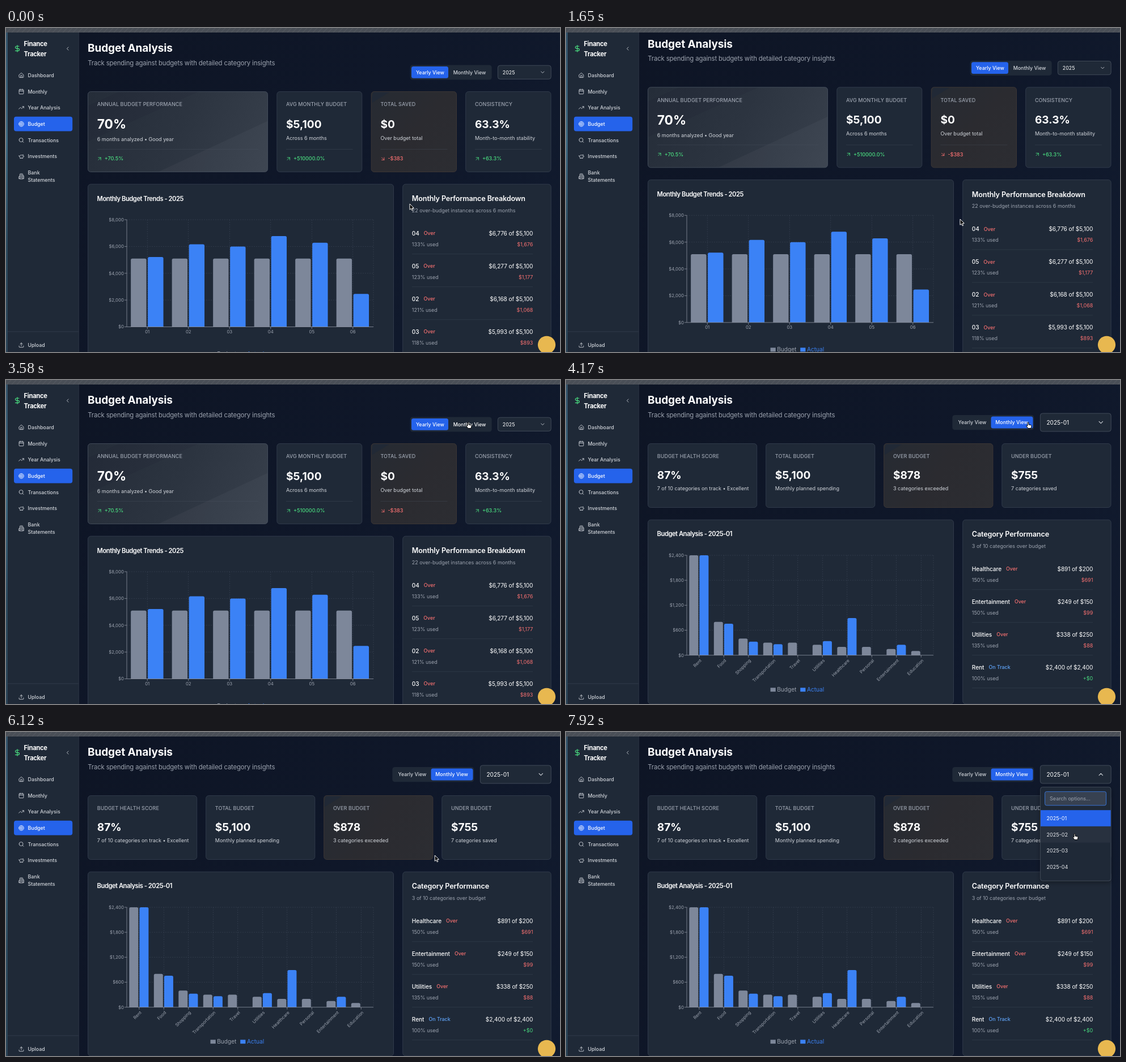
An HTML page with a canvas that plays this animation: 977x573 px, repeating every 8000 ms.

```html
<!DOCTYPE html>
<html lang="en">
<head>
<meta charset="utf-8">
<title>Budget Analysis</title>
<style>
html, body { margin: 0; width: 100%; height: 100%; overflow: hidden; background: #0f1729; }
canvas { display: block; width: 977px; height: 573px; }
</style>
</head>
<body>
<canvas id="stage"></canvas>
<script>
const W = 977, H = 573, LOOP = 8000;
const cv = document.getElementById('stage');
const dpr = window.devicePixelRatio || 1;
cv.width = W * dpr;
cv.height = H * dpr;
const c = cv.getContext('2d');

const WHITE = '#ffffff', SOFT = '#d1d5db', MUTED = '#9ca3af', LINE = '#374151', EDGE = '#4b5563';
const CARD = '#1f2937', BLUE = '#2563eb', BAR = '#3b82f6', GREY = '#7d879a';
const GREEN = '#4ade80', RED = '#f87171', SKY = '#60a5fa';
const SM = 8.86, NOTE = 9.03, BASE = 10.1, TICK = 7.8;

const ICONS = {
  dollar: 'M12 2v20M17 5H9.5a3.5 3.5 0 0 0 0 7h5a3.5 3.5 0 0 1 0 7H6',
  home: 'M15 21v-8a1 1 0 0 0-1-1h-4a1 1 0 0 0-1 1v8M3 10l9-8 9 8v9a2 2 0 0 1-2 2H5a2 2 0 0 1-2-2z',
  calendar: 'M8 2v4M16 2v4M3 10h18M5 4h14a2 2 0 0 1 2 2v14a2 2 0 0 1-2 2H5a2 2 0 0 1-2-2V6a2 2 0 0 1 2-2z',
  trend: 'M22 7l-8.5 8.5-5-5L2 17M16 7h6v6',
  target: 'M2 12a10 10 0 1 0 20 0a10 10 0 1 0-20 0M6 12a6 6 0 1 0 12 0a6 6 0 1 0-12 0M10 12a2 2 0 1 0 4 0a2 2 0 1 0-4 0',
  search: 'M3 11a8 8 0 1 0 16 0a8 8 0 1 0-16 0M21 21l-4.3-4.3',
  piggy: 'M19 5c-1.5 0-2.8 1.4-3 2-3.5-1.5-11-.3-11 5 0 1.8 0 3 2 4.5V20h4v-2h3v2h4v-4c1-.5 1.7-1 2-2h2v-4h-2c0-1-.5-1.5-1-2zM2 9v1c0 1.1.9 2 2 2h1M16 11h.01',
  building: 'M6 22V4a2 2 0 0 1 2-2h8a2 2 0 0 1 2 2v18zM6 12H4a2 2 0 0 0-2 2v8h4M18 9h2a2 2 0 0 1 2 2v11h-4M10 6h4M10 10h4M10 14h4M10 18h4',
  upload: 'M21 15v4a2 2 0 0 1-2 2H5a2 2 0 0 1-2-2v-4M17 8l-5-5-5 5M12 3v12',
  up: 'M7 7h10v10M7 17L17 7',
  down: 'M7 7l10 10M17 7v10H7',
  left: 'M15 18l-6-6 6-6',
  open: 'M6 9l6 6 6-6',
  close: 'M18 15l-6-6-6 6'
};

const YEAR_CARDS = [
  [144.5, 317, 'ANNUAL BUDGET PERFORMANCE', '70%', '6 months analyzed • Good year', '+70.5%'],
  [477.8, 150, 'AVG MONTHLY BUDGET', '$5,100', 'Across 6 months', '+510000.0%'],
  [644.2, 150.3, 'TOTAL SAVED', '$0', 'Over budget total', '-$383'],
  [810.7, 150.3, 'CONSISTENCY', '63.3%', 'Month-to-month stability', '+63.3%']
];
const MONTH_CARDS = [
  ['BUDGET HEALTH SCORE', '87%', '7 of 10 categories on track • Excellent'],
  ['TOTAL BUDGET', '$5,100', 'Monthly planned spending'],
  ['OVER BUDGET', '$878', '3 categories exceeded'],
  ['UNDER BUDGET', '$755', '7 categories saved']
];
const YEAR_ROWS = [
  ['04', 'Over', '$6,776 of $5,100', '133%', '$1,676'],
  ['05', 'Over', '$6,277 of $5,100', '123%', '$1,177'],
  ['02', 'Over', '$6,168 of $5,100', '121%', '$1,068'],
  ['03', 'Over', '$5,993 of $5,100', '118%', '$893']
];
const MONTH_ROWS = [
  ['Healthcare', 'Over', '$891 of $200', '150%', '$691'],
  ['Entertainment', 'Over', '$249 of $150', '150%', '$99'],
  ['Utilities', 'Over', '$338 of $250', '135%', '$88'],
  ['Rent', 'On Track', '$2,400 of $2,400', '100%', '+$0']
];
const YEAR_DATA = [5214, 6168, 5993, 6776, 6277, 2461].map((v, i) => ['0' + (i + 1), 5100, v]);
const MONTH_DATA = [
  ['Rent', 2400, 2400], ['Food', 800, 757], ['Shopping', 400, 325], ['Transportation', 300, 265],
  ['Travel', 300, 0], ['Utilities', 250, 338], ['Healthcare', 200, 891], ['Personal', 200, 0],
  ['Entertainment', 150, 249], ['Education', 100, 0]
];

function text(s, x, y, size, color, weight = 400, align = 'left', space = 0) {
  c.font = `${weight} ${size}px Inter, "Open Sans", sans-serif`;
  c.letterSpacing = space + 'px';
  c.textAlign = align;
  c.fillStyle = color;
  c.fillText(s, x, y + size * 0.364);
  return c.measureText(s).width;
}

function box(x, y, w, h, r, fill, stroke) {
  c.beginPath();
  c.roundRect(x, y, w, h, r);
  if (fill) { c.fillStyle = fill; c.fill(); }
  if (stroke) { c.strokeStyle = stroke; c.lineWidth = 0.8; c.stroke(); }
}

function line(x1, y1, x2, y2, color, width = 0.7) {
  c.beginPath();
  c.moveTo(x1, y1);
  c.lineTo(x2, y2);
  c.strokeStyle = color;
  c.lineWidth = width;
  c.stroke();
}

function icon(name, x, y, size, color) {
  c.save();
  c.translate(x - size / 2, y - size / 2);
  c.scale(size / 24, size / 24);
  c.lineWidth = 2;
  c.lineCap = c.lineJoin = 'round';
  c.strokeStyle = color;
  c.stroke(new Path2D(ICONS[name]));
  c.restore();
}

function blend(x1, y1, x2, y2, ...colors) {
  const g = c.createLinearGradient(x1, y1, x2, y2);
  colors.forEach((k, i) => g.addColorStop(i / (colors.length - 1), k));
  return g;
}

function poly(color, ...p) {
  c.beginPath();
  for (let i = 0; i < p.length; i += 2) c.lineTo(p[i], p[i + 1]);
  c.closePath();
  c.fillStyle = color;
  c.fill();
}

function sidebar() {
  c.fillStyle = CARD;
  c.fillRect(3, 0, 125, H + 20);
  line(128.3, 0, 128.3, H + 20, LINE);
  icon('dollar', 20, 36.3, 14, GREEN);
  text('Finance', 31.5, 28, 11.2, WHITE, 700, 'left', -0.3);
  text('Tracker', 31.5, 46, 11.2, WHITE, 700, 'left', -0.3);
  icon('left', 108.7, 36.5, 10.4, SOFT);
  box(14, 156.7, 103.2, 25.7, 4, BLUE);
  const names = ['Dashboard', 'Monthly', 'Year Analysis', 'Budget', 'Transactions', 'Investments'];
  const icons = ['home', 'calendar', 'trend', 'target', 'search', 'piggy'];
  names.forEach((s, i) => {
    const y = 83.7 + i * 28.68, on = i === 3;
    icon(icons[i], 27, y, 10.4, on ? WHITE : SOFT);
    text(s, 38.5, y, SM, on ? WHITE : SOFT, 500);
  });
  icon('building', 27, 262.2, 10.4, SOFT);
  text('Bank', 38.5, 255.8, SM, SOFT, 500);
  text('Statements', 38.5, 268.8, SM, SOFT, 500);
  line(3, 537, 128, 537, LINE);
  icon('upload', 27, 560.8, 10.4, SOFT);
  text('Upload', 38.5, 560.8, SM, SOFT, 500);
}

function heading() {
  text('Budget Analysis', 144, 35.5, 19, WHITE, 700, 'left', -0.1);
  text('Track spending against budgets with detailed category insights', 144.3, 61.8, 11.3, MUTED, 400, 'left', -0.12);
}

function toggle(x, y, monthly, hover) {
  box(x, y, 144, 26.2, 4.5, CARD);
  if (monthly) box(x + 68.2, y + 2.6, 74, 20.8, 3.5, BLUE);
  else box(x + 2.3, y + 2.6, 65, 20.8, 3.5, BLUE);
  text('Yearly View', x + 35.2, y + 13, SM, monthly ? SOFT : WHITE, 500, 'center');
  text('Monthly View', x + 104.8, y + 13, SM, monthly || hover ? WHITE : SOFT, 500, 'center');
}

function statCard(x, y, w, h, warm) {
  if (!warm) return box(x, y, w, h, 5, CARD, LINE);
  box(x, y, w, h, 5, blend(x, y, x + w, y + h, '#262b33', '#2b2b30', '#2c2d32'), '#453b38');
  poly('rgba(31,41,55,.7)', x + 1, y + 12, x + 4, y + 1, x + 32, y + 1, x + 1, y + 20);
}

function shinyCard(x, y, w, h) {
  c.save();
  box(x, y, w, h, 5, blend(x, y, x + w, y + h, '#252d39', '#2c3440', '#38404c'));
  c.clip();
  const b = y + h, r = x + w;
  poly('rgba(255,255,255,.03)', x + 124, b, r, y + 52, r, b);
  poly('rgba(15,23,42,.08)', x + 55, y, x + 195, y, x, y + 88, x, y + 25);
  c.restore();
  box(x, y, w, h, 5, null, EDGE);
}

function title(s, x, y) { text(s, x, y, 11.2, WHITE, 600, 'left', -0.47); }

function rows(list, y0) {
  list.forEach(([name, tag, amount, used, diff], i) => {
    const y = y0 + i * 58, over = tag === 'Over';
    const w = text(name, 715.8, y, BASE, WHITE, 500, 'left', -0.05);
    text(tag, 716 + w + 7.8, y, SM, over ? RED : SKY, 500);
    text(amount, 929.3, y, BASE, WHITE, 400, 'right', -0.1);
    text(used + ' used', 715.8, y + 19.3, NOTE, MUTED);
    text(diff, 929.3, y + 19.3, NOTE, over ? RED : GREEN, 400, 'right');
    line(716, y + 36.7, 929, y + 36.7, 'rgba(75,85,99,.45)');
  });
}

function chart(data, top, bottom, max, grow, slant) {
  const x0 = 213, x1 = 648, band = (x1 - x0) / data.length, h = bottom - top;
  const gap = slant ? 2.1 : 2.6, bw = slant ? 16 : 27.4;
  const pad = (band - bw * 2 - gap) / 2 - 0.4;
  c.setLineDash([2, 2]);
  for (let i = 1; i <= 4; i++) line(x0, bottom - h * i / 4, x1, bottom - h * i / 4, LINE);
  data.forEach((d, i) => line(x0 + band * (i + 0.5), top, x0 + band * (i + 0.5), bottom, LINE));
  line(x1, top, x1, bottom, LINE);
  c.setLineDash([]);
  data.forEach(([name, ...vals], i) => {
    const mid = x0 + band * (i + 0.5);
    vals.forEach((v, k) => {
      const bh = h * v / max * grow, r = Math.min(2.6, bh);
      if (bh > 0) box(x0 + band * i + pad + k * (bw + gap), bottom - bh, bw, bh, [r, r, 0, 0], k ? BAR : GREY);
    });
    line(mid, bottom, mid, bottom + 4, MUTED);
    if (!slant) return text(name, mid, bottom + 8.7, TICK, MUTED, 400, 'center');
    c.save();
    c.translate(mid + 2.7, bottom + 8);
    c.rotate(-Math.PI / 4);
    text(name, 0, 0, TICK, MUTED, 400, 'right');
    c.restore();
  });
  line(x0, top, x0, bottom, MUTED);
  line(x0, bottom, x1, bottom, MUTED);
  for (let i = 0; i <= 4; i++) {
    const y = bottom - h * i / 4;
    line(x0 - 4, y, x0, y, MUTED);
    text('$' + (max * i / 4).toLocaleString('en-US'), 207.8, y, TICK, MUTED, 400, 'right');
  }
}

function legend(y) {
  c.fillStyle = GREY;
  c.fillRect(360.5, y - 2.9, 9.2, 6.9);
  c.fillStyle = BAR;
  c.fillRect(413.2, y - 2.9, 9.2, 6.9);
  text('Budget', 372.2, y, BASE, MUTED);
  text('Actual', 425, y, BASE, BAR);
}

function panel(y, h, name, note) {
  box(699.7, y, 261.5, h, 5, CARD, LINE);
  text(name, 715.8, y + 25.5, 12.6, WHITE, 600, 'left', -0.13);
  text(note, 715.8, y + 46.2, NOTE, MUTED);
}

function yearView(hover) {
  heading();
  toggle(712.7, 65.4, false, hover);
  box(867.4, 66.2, 93.8, 24.2, 4, CARD, EDGE);
  text('2025', 875.8, 78.3, SM, WHITE);
  icon('open', 946.3, 78.3, 10.4, SOFT);
  YEAR_CARDS.forEach(([x, w, label, value, note, trend], i) => {
    const tx = x + 16.2, neg = i === 2, col = neg ? RED : GREEN;
    if (i) statCard(x, 112.5, w, 142, neg);
    else shinyCard(x, 112.5, w, 142);
    text(label, tx, 135.2, 9, MUTED, 500, 'left', 0.08);
    text(value, tx, 170, i ? 19.1 : 22.8, WHITE, 700);
    text(note, tx, i ? 194.7 : 197, NOTE, SOFT);
    line(tx, 214.5, x + w - 16.2, 214.5, 'rgba(75,85,99,.5)');
    icon(neg ? 'down' : 'up', tx + 4.3, 231.2, 10.4, col);
    text(trend, tx + 13, 231.2, NOTE, col, 500);
  });
  box(144.5, 276.2, 539, 326, 5, CARD, LINE);
  title('Monthly Budget Trends - 2025', 160.6, 301.5);
  chart(YEAR_DATA, 339, 528.5, 8000, 1, false);
  legend(576);
  panel(276.2, 326, 'Monthly Performance Breakdown', '22 over-budget instances across 6 months');
  rows(YEAR_ROWS, 363);
}

function monthView(grow, open) {
  heading();
  toggle(681.3, 62, true);
  box(836.4, 59, 124.8, 32, 4, CARD, EDGE);
  text('2025-01', 847.4, 75.2, BASE, WHITE);
  icon(open ? 'close' : 'open', 943.3, 75, 13, SOFT);
  MONTH_CARDS.forEach(([label, value, note], i) => {
    const x = 144.5 + i * 208.1;
    statCard(x, 112.5, 192.2, 113, i === 2);
    text(label, x + 16.2, 135.2, 9, MUTED, 500, 'left', 0.08);
    text(value, x + 16.2, 167.6, 19.1, WHITE, 700);
    text(note, x + 16.2, 192, NOTE, SOFT);
  });
  box(144.5, 247.3, 539, 325.5, 5, CARD, LINE);
  title('Budget Analysis - 2025-01', 160.6, 272.4);
  chart(MONTH_DATA, 310, 486.7, 2400, grow, true);
  legend(547.2);
  panel(247.3, 325.5, 'Category Performance', '3 of 10 categories over budget');
  rows(MONTH_ROWS, 334);
}

function dropdown(y) {
  c.save();
  c.shadowColor = 'rgba(0,0,0,.35)';
  c.shadowBlur = 8 * dpr;
  c.shadowOffsetY = 3 * dpr;
  box(836.6, 97.3, 124.4, 166, 4, CARD);
  c.restore();
  box(836.6, 97.3, 124.4, 166, 4, null, EDGE);
  box(844.6, 105.4, 108, 24.4, 3, LINE, BAR);
  text('Search options...', 853, 117.6, NOTE, MUTED);
  for (let i = 0; i < 4; i++) {
    const top = 138.2 + i * 28.7, hot = y >= top && y < top + 28.7;
    if (i === 0 || hot) {
      c.fillStyle = i ? '#28313f' : BLUE;
      c.fillRect(837, top, 123.6, 28.7);
    }
    text('2025-0' + (i + 1), 847.4, top + 14.5, 9.1, i ? '#e5e7eb' : WHITE);
  }
}

function pointer(x, y, hand) {
  c.save();
  c.translate(x, y);
  c.lineJoin = 'round';
  const p = new Path2D(hand
    ? 'M-1 .8a1 1 0 0 1 2 0V4l4 .8q1.2 .3 1 1.6L5.3 9.2V10.5H0L-3 6.8q-.6-1.2 .6-1.3L-1 6.2z'
    : 'M0 0V10.3L2.4 8.2 4 11.8 5.6 11.1 4.1 7.6 7.2 7.3z');
  c.lineWidth = 1;
  c.fillStyle = hand ? WHITE : '#000';
  c.strokeStyle = hand ? '#000' : WHITE;
  c.fill(p);
  c.stroke(p);
  c.restore();
}

// [first step, last step, steps, end x, y, optional bend x, y]
const MOVES = [
  [150, 450, 3, 695, 338],
  [2240, 2980, 6, 815, 75, 630, 250],
  [4770, 5220, 4, 701, 283],
  [6120, 6570, 4, 922, 23],
  [6720, 7170, 4, 900, 72],
  [7770, 7920, 2, 897, 180]
];

// Progress held between evenly timed steps.
function stepped(t, first, last, n) {
  if (t < first) return 0;
  return Math.min(n, Math.floor((t - first) / ((last - first) / (n - 1)) + 1.001)) / n;
}

function cursorAt(t) {
  let x = 712, y = 311;
  for (const [a, b, n, tx, ty, bx = (x + tx) / 2, by = (y + ty) / 2] of MOVES) {
    if (t < a) break;
    const p = stepped(t, a, b, n), q = 1 - p;
    x = q * q * x + 2 * p * q * bx + p * p * tx;
    y = q * q * y + 2 * p * q * by + p * p * ty;
  }
  return [x, y];
}

function scrollAt(t) {
  if (t >= 750 && t < 1650) return -17.5;
  if (t >= 1650 && t < 1790) return -7.7;
  return 0;
}

function bounceAt(t) {
  if (t < 5670 || t >= 6120) return 0;
  return [-5.2, -2.6, -0.8][Math.floor((t - 5670) / 150)];
}

function edges() {
  c.fillStyle = '#4a4f57';
  c.fillRect(0, 0, W, 8);
  for (let x = -8; x < W; x += 9) line(x, 8, x + 8, 0, 'rgba(255,255,255,.05)', 1.5);
  c.fillStyle = blend(0, 8, 0, H, '#33536a', '#3f6a82', '#2c4a5e', '#2a4356');
  c.fillRect(0, 8, 3, H);
}

function draw(t) {
  c.setTransform(dpr, 0, 0, dpr, 0, 0);
  c.fillStyle = blend(128, 8, W, H, '#0e1525', '#0f1729', '#111b2f');
  c.fillRect(0, 0, W, H);
  const [mx, my] = cursorAt(t);
  const monthly = t >= 3730, open = t >= 7470;
  const onToggle = mx > 781 && mx < 855 && my > 62 && my < 90;
  c.save();
  c.translate(0, bounceAt(t));
  sidebar();
  c.translate(0, scrollAt(t));
  if (monthly) {
    const p = Math.min(1, Math.floor((t - 3730) / 146.6) / 3);
    monthView(1 - (1 - p) ** 3, open);
  } else {
    yearView(onToggle);
  }
  c.restore();
  if (open) dropdown(my);
  edges();
  c.beginPath();
  c.arc(953.5, 560.3, 15.6, 0, Math.PI * 2);
  c.fillStyle = '#e8b850';
  c.fill();
  const onSelect = monthly && mx > 836 && mx < 961 && my > 59 && my < (open ? 263 : 91);
  pointer(mx, my, onToggle || onSelect);
}

const start = performance.now();
function frame(now) {
  draw(Math.max(0, now - start) % LOOP);
  requestAnimationFrame(frame);
}
draw(0);
requestAnimationFrame(frame);
</script>
</body>
</html>
```
